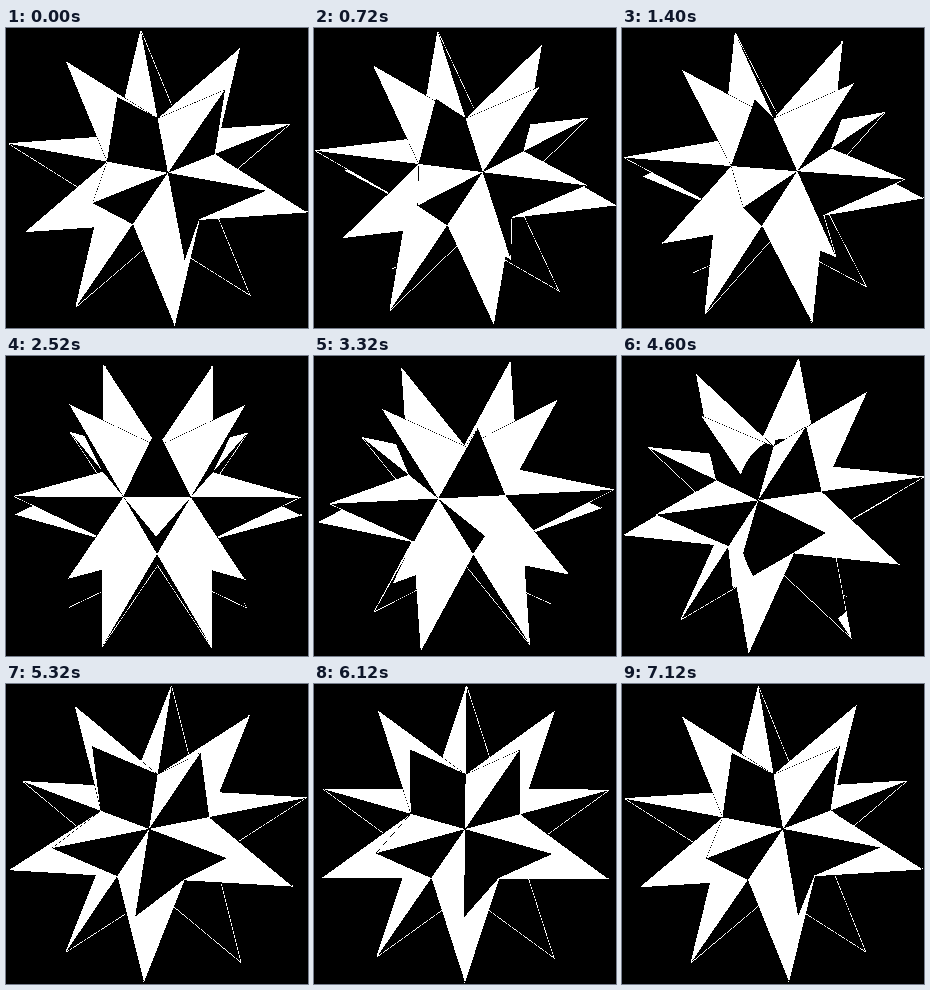
Recreate the animation shown at these times as an HTML page with a canvas. Size 302x300 px, loop 7240 ms.

```html
<!DOCTYPE html>
<html lang="en">
<head>
<meta charset="utf-8">
<title>Turning star polyhedron</title>
<style>
  html, body { margin: 0; width: 100%; height: 100%; overflow: hidden; background: #000; }
  canvas { display: block; }
</style>
</head>
<body>
<canvas id="stage" width="302" height="300"></canvas>
<script>
const W = 302, H = 300, CX = 151.6, CY = 149.8;
const LOOP = 7240, TICK = 40, STEP = 100, STEPS = 72, START_ANGLE = -61.6;
const TIP_R = 152.5, CORE_R = TIP_R * 0.4195;
const TILT = 22.4 * Math.PI / 180;
const LIGHT = [-0.4, 0.6, 0.7], THRESHOLD = 0.28;
// Shade rises slightly with distance from this point.
const DIM = { x: 4, y: -33, z: 6, radius: 93, rate: 0.0005 };
const LIT_RIM = 0.7, DARK_RIM = 0.4;

const ctx = document.getElementById('stage').getContext('2d');
const image = ctx.createImageData(W, H);
const pixels = new Uint32Array(image.data.buffer);
const depth = new Float32Array(W * H);
const BLACK = 0xff000000, WHITE = 0xffffffff;

const dot = (a, b) => a[0] * b[0] + a[1] * b[1] + a[2] * b[2];
const scale = (a, s) => a.map(v => v * s);

// Great stellated dodecahedron: three-sided spikes on an icosahedral core.
function buildSpikes() {
  const core = [[0, 1, 0], [0, -1, 0]];
  for (let i = 0; i < 10; i++) {
    const a = i * Math.PI / 5;
    const y = (i % 2 ? -1 : 1) / Math.sqrt(5);
    core.push([2 / Math.sqrt(5) * Math.sin(a), y, 2 / Math.sqrt(5) * Math.cos(a)]);
  }
  const touching = (a, b) => a !== b && dot(a, b) > 0.4;
  const sides = [];
  core.forEach((p, i) => core.slice(i + 1).forEach(q => {
    if (!touching(p, q)) return;
    const [u, v] = core.filter(c => touching(c, p) && touching(c, q));
    for (const [normal, third] of [[u, v], [v, u]]) {
      const sum = p.map((c, k) => c + q[k] + third[k]);
      const tip = scale(sum, TIP_R / Math.hypot(...sum));
      sides.push({ normal, points: [scale(p, CORE_R), scale(q, CORE_R), tip] });
    }
  }));
  return sides;
}

function rotator(angle) {
  const c = Math.cos(angle), s = Math.sin(angle);
  const ct = Math.cos(TILT), st = Math.sin(TILT);
  return ([x, y, z]) => {
    const turned = z * c - x * s;
    return [x * c + z * s, y * ct - turned * st, y * st + turned * ct];
  };
}

// Signed distances to the edges, as lines a*x + b*y + c, positive inside.
function edgeLines(points) {
  return points.map((p, i) => {
    const q = points[(i + 1) % 3], r = points[(i + 2) % 3];
    const len = Math.hypot(q[0] - p[0], q[1] - p[1]) || 1;
    const a = (p[1] - q[1]) / len, b = (q[0] - p[0]) / len;
    const c = -a * p[0] - b * p[1];
    return a * r[0] + b * r[1] + c < 0 ? [-a, -b, -c] : [a, b, c];
  });
}

function drawSide(normal, points) {
  const [nx, ny, nz] = normal;
  if (Math.abs(nz) < 0.012) return;
  const offset = dot(normal, points[0]);
  const glow = dot(normal, LIGHT) * Math.sign(nz);
  // Sides turned away show only as a thin rim along the outline.
  const rim = glow > THRESHOLD ? LIT_RIM : DARK_RIM;
  const margin = nz < 0 ? rim : 0;
  const lines = edgeLines(points);
  const xs = points.map(p => p[0] + CX), ys = points.map(p => CY - p[1]);
  const x0 = Math.max(0, Math.floor(Math.min(...xs))), x1 = Math.min(W - 1, Math.ceil(Math.max(...xs)));
  const y0 = Math.max(0, Math.floor(Math.min(...ys))), y1 = Math.min(H - 1, Math.ceil(Math.max(...ys)));
  for (let py = y0; py <= y1; py++) {
    const y = CY - py - 0.5;
    for (let px = x0; px <= x1; px++) {
      const x = px + 0.5 - CX;
      if (lines.some(([a, b, c]) => a * x + b * y + c < -margin)) continue;
      const z = (offset - nx * x - ny * y) / nz;
      const at = py * W + px;
      if (z <= depth[at]) continue;
      depth[at] = z;
      const reach = Math.hypot(x - DIM.x, y - DIM.y, z - DIM.z);
      const shade = glow + DIM.rate * (reach - DIM.radius);
      pixels[at] = shade > THRESHOLD ? WHITE : BLACK;
    }
  }
}

const sides = buildSpikes();
let shown = -1;

function draw(step) {
  pixels.fill(BLACK);
  depth.fill(-1e4);
  const turn = rotator((step + START_ANGLE) * Math.PI / 180);
  for (const { normal, points } of sides) drawSide(turn(normal), points.map(turn));
  ctx.putImageData(image, 0, 0);
}

function tick() {
  const time = performance.now() % LOOP;
  const step = Math.min(STEPS - 1, Math.floor(Math.floor(time / TICK) * TICK / STEP));
  if (step !== shown) draw(shown = step);
  requestAnimationFrame(tick);
}
tick();
</script>
</body>
</html>
```
